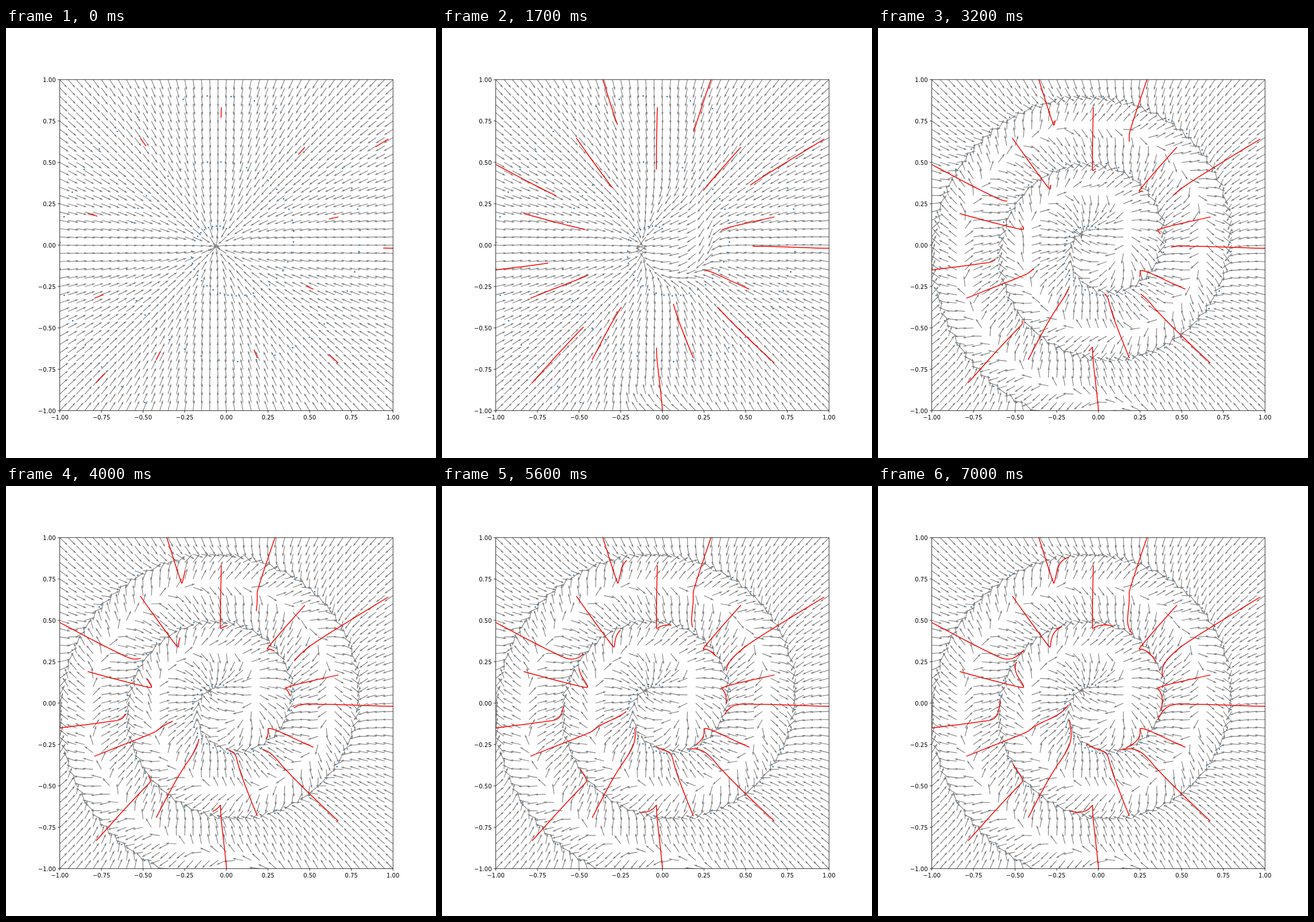
Write an HTML page with a canvas that moves like this. It is 748 by 748 pixels and loops after 7.1 s.

```html
<!DOCTYPE html>
<html lang="en">
<head>
<meta charset="utf-8">
<title>Vector field on a spiral</title>
<style>
  html, body { margin: 0; width: 100%; height: 100%; overflow: hidden; background: #fff; }
  canvas, svg { position: absolute; left: 0; top: 0; width: 748px; height: 748px; }
  text { font: 10px "DejaVu Sans", sans-serif; fill: #000; }
</style>
</head>
<body>
<canvas id="field" width="748" height="748"></canvas>
<svg id="axes" viewBox="0 0 748 748"></svg>
<script>
const STEP = 100, STEPS = 71;
const LEFT = 93.5, RIGHT = 673.2, TOP = 89.8, BOTTOM = 665.7;
const px = x => LEFT + (x + 1) / 2 * (RIGHT - LEFT);
const py = y => BOTTOM - (y + 1) / 2 * (BOTTOM - TOP);

// Axes frame, ticks and labels
const svg = document.getElementById('axes');
function add(name, attrs, text) {
  const el = document.createElementNS('http://www.w3.org/2000/svg', name);
  for (const key in attrs) el.setAttribute(key, attrs[key]);
  if (text) el.textContent = text;
  svg.appendChild(el);
}
const ink = { fill: 'none', stroke: '#000', 'stroke-width': 0.8 };
add('rect', { x: LEFT, y: TOP, width: RIGHT - LEFT, height: BOTTOM - TOP, ...ink });
for (let i = -4; i <= 4; i++) {
  const v = i / 4, label = v.toFixed(2).replace('-', '\u2212');
  add('path', { d: `M${px(v)} ${BOTTOM}v3.5M${LEFT} ${py(v)}h-3.5`, ...ink });
  add('text', { x: px(v), y: 681, 'text-anchor': 'middle' }, label);
  add('text', { x: LEFT - 7, y: py(v) + 3.8, 'text-anchor': 'end' }, label);
}

// Data: an Archimedean spiral of 100 points
const dots = Array.from({ length: 100 }, (_, i) => {
  const a = Math.PI * (0.5 + 5 * i / 99), r = a / (5 * Math.PI);
  return [r * Math.cos(a), r * Math.sin(a)];
});

// Kernel width shrinks with each step, the swirl fades in late
const width = k => 0.115 + 0.75 * Math.exp(-k / 6.5) + 0.015 * Math.exp(-k / 25);
const swirl = k => 0.035 * Math.min(1, Math.max(0, (k - 20) / 15));

// Pull towards the kernel-weighted mean of the dots, turned slightly clockwise
function pull(x, y, k) {
  const c = 1 / (2 * width(k) ** 2);
  let sx = 0, sy = 0, sum = 0;
  for (const [a, b] of dots) {
    const dx = a - x, dy = b - y, w = Math.exp(-c * (dx * dx + dy * dy));
    sx += w * dx; sy += w * dy; sum += w;
  }
  const turn = swirl(k) / (Math.hypot(x, y) + 0.15);
  return [sx / sum + turn * y, sy / sum - turn * x];
}

// Particles start on two loose rings and follow the field
const starts = [
  [1.02, -.02], [.97, .64], [.36, 1.2], [-.44, 1.27], [-1.08, .53],
  [-1.16, -.17], [-.78, -.83], [.01, -1.09], [.67, -.71],
  [.67, .17], [.47, .59], [-.03, .83], [-.515, .645], [-.83, .19],
  [-.79, -.32], [-.42, -.69], [.185, -.68], [.52, -.265]
];
const RATE = 0.09;
const trails = starts.map(([x, y]) => {
  const points = [[px(x), py(y)]];
  for (let k = 0; k < STEPS; k++) {
    const [dx, dy] = pull(x, y, k);
    x += RATE * dx;
    y += RATE * dy;
    points.push([px(x), py(y)]);
  }
  return points;
});

const ctx = document.getElementById('field').getContext('2d');
const LENGTH = 19, THICK = 1.16;
const HEAD = LENGTH - 5 * THICK, NOTCH = LENGTH - 4.5 * THICK;

function arrow(x, y, dx, dy) {
  ctx.save();
  ctx.translate(x, y);
  ctx.rotate(Math.atan2(-dy, dx));
  ctx.beginPath();
  ctx.moveTo(LENGTH, 0);
  for (const side of [1, -1]) {
    const shaft = [[NOTCH, side * THICK / 2], [0, side * THICK / 2]];
    const half = [[HEAD, side * THICK * 1.5], ...shaft];
    (side > 0 ? half : half.reverse()).forEach(p => ctx.lineTo(...p));
  }
  ctx.fill();
  ctx.restore();
}

function draw(k) {
  ctx.fillStyle = '#fff';
  ctx.fillRect(0, 0, 748, 748);
  ctx.save();
  ctx.beginPath();
  ctx.rect(LEFT, TOP, RIGHT - LEFT, BOTTOM - TOP);
  ctx.clip();

  ctx.fillStyle = '#1f77b4';
  for (const [x, y] of dots) {
    ctx.beginPath();
    ctx.arc(px(x), py(y), 1.25, 0, 7);
    ctx.fill();
  }

  ctx.fillStyle = '#808080';
  for (let i = -20; i <= 20; i++) {
    for (let j = -20; j <= 20; j++) {
      const x = i / 20, y = j / 20;
      arrow(px(x), py(y), ...pull(x, y, k));
    }
  }

  ctx.strokeStyle = '#f00';
  ctx.lineWidth = 1.5;
  ctx.lineJoin = 'round';
  ctx.lineCap = 'square';
  for (const points of trails) {
    ctx.beginPath();
    points.slice(0, k + 2).forEach(p => ctx.lineTo(...p));
    ctx.stroke();
  }
  ctx.restore();
}

const start = performance.now();
let shown = -1;
function tick() {
  const k = Math.floor((performance.now() - start) / STEP) % STEPS;
  if (k !== shown) draw(shown = k);
  requestAnimationFrame(tick);
}
tick();
</script>
</body>
</html>
```
